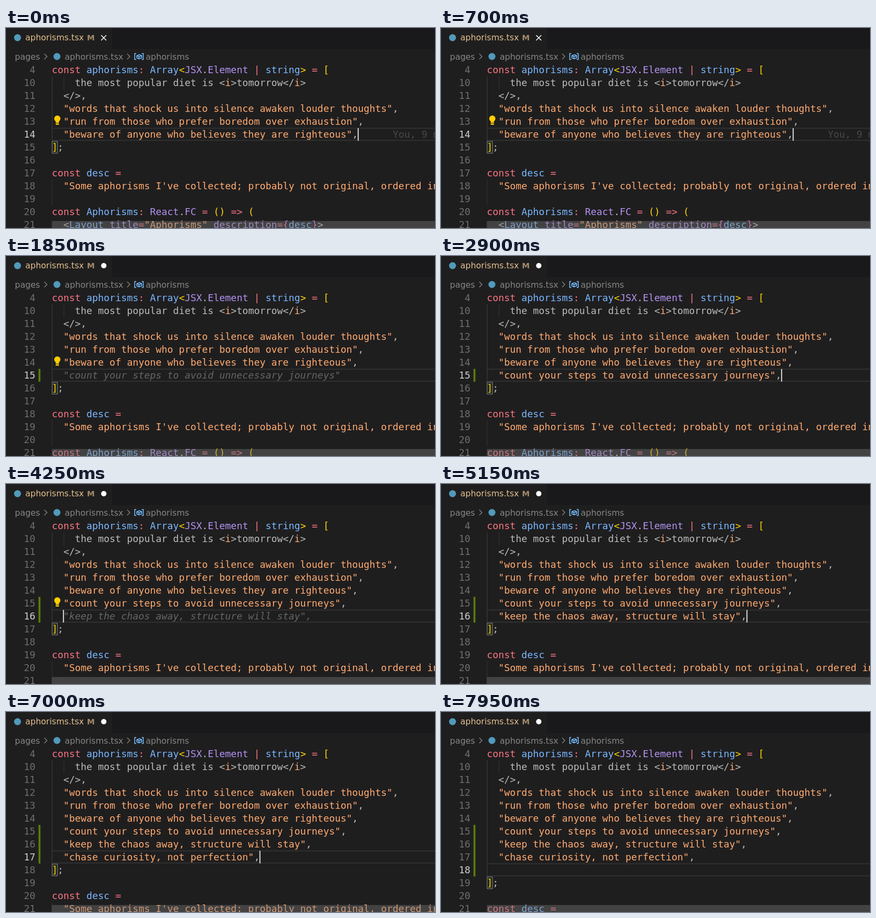
Write an HTML page that moves like this. It is 800 by 372 pixels and loops after 8000 ms.

```html
<!DOCTYPE html>
<html lang="en">
<head>
<meta charset="utf-8">
<title>Code editor</title>
<style>
  html, body { margin: 0; width: 100%; height: 100%; overflow: hidden; background: #1f1e1f; }
  svg { display: block; width: 100%; height: 100%; }
  text { white-space: pre; }
  .ui { font: 15.57px "DejaVu Sans", sans-serif; fill: #868686; }
  .code { font: 17.9px "DejaVu Sans Mono", monospace; font-variant-ligatures: none; }
  .num { fill: #6e6e6e; text-anchor: end; }
  .num.active { fill: #d0d0d0; }
  .r { fill: #f97583; }
  .b { fill: #79b8ff; }
  .p { fill: #b392f0; }
  .s { fill: #ffab70; }
  .y { fill: #ffd700; }
  .o { fill: #da70d6; }
  .w { fill: #bbbbbb; }
  .g { fill: #666; font-style: italic; }
  .blame { fill: #484848; }
</style>
</head>
<body>
<svg viewBox="0 0 800 372" preserveAspectRatio="none">
  <rect width="800" height="372" fill="#1f1e1f"/>
  <rect x="198" width="602" height="39" fill="#19181a"/>

  <circle cx="21.5" cy="18" r="6.5" fill="#519aba"/>
  <text class="ui" x="36" y="23" style="fill:#e2c08d">aphorisms.tsx</text>
  <text class="ui" x="151" y="23" style="fill:#a28b68;font-size:14.5px;font-weight:bold">M</text>
  <path id="close" d="M177.5 13.5l9.5 9.5m0-9.5l-9.5 9.5" stroke="#fff" stroke-width="1.5"/>
  <circle id="dirty" cx="182.3" cy="18" r="5" fill="#fff"/>

  <text class="ui" x="16.5" y="58.5">pages</text>
  <circle cx="95" cy="53" r="6.5" fill="#519aba"/>
  <text class="ui" x="109.5" y="58.5">aphorisms.tsx</text>
  <text class="ui" x="260.5" y="58.5">aphorisms</text>
  <path d="M71.5 48l5 5-5 5M226 48l5 5-5 5" fill="none" stroke="#868686" stroke-width="1.3"/>
  <path d="M243 47.5h-3v11h3M253 47.5h3v11h-3M244 51.5l5-2 4 2v4l-5 2-4-2zl4 2 5-2m-5 2v4"
        fill="none" stroke="#75beff" stroke-width="1.5"/>

  <g id="editor"></g>
  <rect x="85.5" y="359" width="715" height="13" fill="#797979" fill-opacity=".4"/>
</svg>
<script>
const LOOP = 8000, CHAR = 10.776, LEFT = 85.4, TOP = 66.25, ROW = 23.95;
const ROWS = 13, FIRST_ENTRY = 6, BLINK = 500;
const byId = id => document.getElementById(id);
const editor = byId("editor");

// "~x" starts a run styled with class x.
const quote = s => `  ~s"${s}"~w,`;
const head = [
  "~rconst ~baphorisms~r: ~bArray~y<~pJSX~w.~pElement ~r| ~bstring~y> ~r= ~y[",
  "~w    the most popular diet is <~si~w>tomorrow</~si~w>",
  "~w  </>,",
  quote("words that shock us into silence awaken louder thoughts"),
  quote("run from those who prefer boredom over exhaustion"),
  quote("beware of anyone who believes they are righteous"),
];
const tail = [
  "~y]~w;",
  "",
  "~rconst ~bdesc ~r=",
  '  ~s"Some aphorisms I\'ve collected; probably not original, ordered in',
  "",
  "~rconst ~bAphorisms~r: ~pReact~w.~pFC ~r= ~y() ~r=> ~y(",
  '~w  <~bLayout ~ptitle~r=~s"Aphorisms" ~pdescription~r=~o{~bdesc~o}~w>',
];

// Times of the new line, the suggestion, its acceptance and the trailing comma.
const entries = [
  { open: 1100, hint: 1600, accept: 2500, comma: 2700, text: "count your steps to avoid unnecessary journeys" },
  { open: 3150, hint: 3700, accept: 4700, comma: 4700, text: "keep the chaos away, structure will stay" },
  { open: 5350, hint: 5750, accept: 6500, comma: 6750, text: "chase curiosity, not perfection" },
  { open: 7400, hint: LOOP, accept: LOOP, comma: LOOP, text: "" },
];
const keystrokes = entries.flatMap(e => [e.open, e.accept, e.comma]);

function entryLine(e, t) {
  if (t >= e.comma) return quote(e.text);
  if (t >= e.accept) return `  ~s"${e.text}"`;
  if (t >= e.hint) return `  ~g"${e.text}"${e.comma === e.accept ? "," : ""}`;
  return "  ";
}

function add(tag, attrs, parent = editor) {
  const el = document.createElementNS("http://www.w3.org/2000/svg", tag);
  for (const k in attrs) el.setAttribute(k, attrs[k]);
  return parent.appendChild(el);
}
const rect = (x, y, width, height, fill) => add("rect", { x, y, width, height, fill });
const rowTop = i => TOP + i * ROW;
const colX = c => LEFT + c * CHAR;
const codeText = (x, row, cls, str = "") => {
  const el = add("text", { x, y: rowTop(row) + 17.9, class: "code " + cls });
  el.textContent = str;
  return el;
};
const plain = line => line.replace(/~[a-z]/g, "");

function drawLine(line, row) {
  const text = codeText(LEFT, row, "w");
  line.split("~").forEach((run, i) => {
    const span = add("tspan", i ? { class: run[0] } : {}, text);
    span.textContent = i ? run.slice(1) : run;
  });
}

function drawBulb(row) {
  const y = rowTop(row);
  add("path", {
    d: `M92.7 ${y + 11.5}a5.8 5.8 0 1 1 6 0v3h-6z`, fill: "#ffcc00",
  });
  rect(92.7, y + 15.5, 6, 2.5, "#ffcc00");
}

function draw({ lines, added, active, bulb, cursorOn, column }) {
  editor.replaceChildren();
  const y = rowTop(active);
  const close = FIRST_ENTRY + added;

  rect(85.5, y - .5, 715, 2, "#313031");
  rect(85.5, y + ROW - 2, 715, 2, "#313031");

  rect(85.5, rowTop(1), 1, (close - 1) * ROW, "#404040");
  rect(107.5, rowTop(1), 1, ROW, "#353535");
  rect(85.5, rowTop(close + 3), 1, ROW * 2, "#353535");
  if (added) rect(60.6, rowTop(FIRST_ENTRY), 3.6, added * ROW, "#587c0c");

  add("rect", {
    x: 86, y: rowTop(close) + 1, width: 10, height: ROW - 2,
    fill: "#242820", stroke: "#858585",
  });
  lines.slice(0, ROWS).forEach((line, i) => {
    codeText(54.8, i, i === active ? "num active" : "num", i ? i + 9 : 4);
    drawLine(line, i);
  });

  if (!added) codeText(colX(59), active, "blame", "You, 9 months ago");
  if (bulb) drawBulb(active - 1);
  if (cursorOn) rect(colX(column) - .8, y + .3, 2, ROW - .5, "#d8d8d8");

  byId("close").style.display = added ? "none" : "";
  byId("dirty").style.display = added ? "" : "none";
}

function stateAt(t) {
  const open = entries.filter(e => t >= e.open);
  const added = open.length, entry = open[added - 1];
  const lines = [...head, ...open.map(e => entryLine(e, t)), ...tail];
  const active = FIRST_ENTRY - 1 + added;
  const lastKey = Math.max(-400, ...keystrokes.filter(k => k <= t));
  return {
    lines, added, active,
    bulb: !entry || (t >= entry.hint && t < entry.accept),
    cursorOn: Math.floor((t - lastKey) / BLINK) % 2 === 0,
    column: entry && t < entry.accept ? 2 : plain(lines[active]).length,
  };
}

let shown = "";
function tick() {
  const state = stateAt(performance.now() % LOOP);
  const key = JSON.stringify(state);
  if (key !== shown) {
    shown = key;
    draw(state);
  }
  requestAnimationFrame(tick);
}
tick();
</script>
</body>
</html>
```
